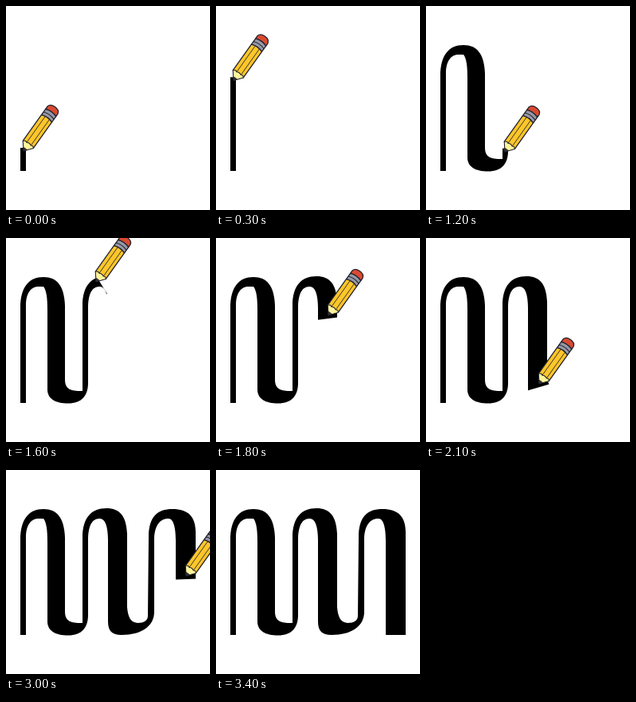
Recreate the animation shown at these times as an HTML page with a canvas. Size 256 by 256 pixels, loop 5.4 s.

```html
<!DOCTYPE html>
<html>
<head>
<meta charset="utf-8">
<style>
html, body { margin: 0; width: 100%; height: 100%; overflow: hidden; background: #fff; }
canvas { display: block; width: 100vw; height: 100vh; }
</style>
</head>
<body>
<canvas id="stage" width="256" height="256"></canvas>
<script>
const canvas = document.getElementById('stage');
const ctx = canvas.getContext('2d');
const STEP = 100, LOOP = 5400, LAST = 34;
const INK = '#000', OUTLINE = '#20202c';

const letter = new Path2D(`M18 207V88C18 61 29 49 47 49C64 49 73 60 74 85V178
  C74 192 85 192 96 192V85C96 60 107 48 126 48C143 48 151 58 152 80V172
  C153 184 156 191 165 192C173 192 178 189 178 183L179 85
  C179 58 190 49 209 49C228 49 238 58 238 78V207H213V88
  C213 72 210 61 204 61C194 61 187 68 186 85V178
  C186 196 170 207 145 207C133 207 128 202 128 190V88
  C128 70 124 61 118 61C110 61 104 66 103 85V182
  C103 198 95 207.5 78 207.5C62 207.5 52 202 52 190V90
  C52 76 51 66 47 61H41C32 61 25 68 25 85V207Z`);

// The pen starts below the letter, then stops at one point per step.
const route = [
  [21.5, 212], [22, 182], [22, 152], [22, 123], [22, 93.5], [25, 66], [46, 54],
  [63, 81], [63, 110], [63, 141], [63, 170], [70, 196], [92, 200],
  [99, 183], [99, 150], [99, 116], [100, 83], [113, 55], [134, 62],
  [141, 97], [142, 126], [142, 154], [142, 183], [155, 199], [178, 172],
  [182, 139], [182, 108], [182, 77], [190, 58], [209, 54], [223, 90],
  [226, 133], [226, 161], [226, 188], [226, 206]
];

function tangent(i) {
  const a = route[Math.max(i - 1, 0)];
  const b = route[Math.min(i + 1, route.length - 1)];
  return [(b[0] - a[0]) / 2, (b[1] - a[1]) / 2];
}

function tracePath(end) {
  const path = new Path2D();
  path.moveTo(...route[0]);
  for (let i = 1; i <= end; i++) {
    const [x0, y0] = route[i - 1], [x1, y1] = route[i];
    const [u0, v0] = tangent(i - 1), [u1, v1] = tangent(i);
    path.bezierCurveTo(x0 + u0 / 3, y0 + v0 / 3, x1 - u1 / 3, y1 - v1 / 3, x1, y1);
  }
  const [x, y] = route[end], [u, v] = tangent(end);
  const reach = 4 / Math.hypot(u, v);
  path.lineTo(x + u * reach, y + v * reach);
  return path;
}

function shape(d, fill, width = 1.3) {
  const path = new Path2D(d);
  if (fill) {
    ctx.fillStyle = fill;
    ctx.fill(path);
  }
  ctx.strokeStyle = OUTLINE;
  ctx.lineWidth = width;
  ctx.stroke(path);
}

// Drawn along the x axis with its tip at the origin.
function drawPencil(x, y) {
  ctx.save();
  ctx.translate(x, y);
  ctx.rotate(-0.953);
  ctx.lineJoin = 'round';
  shape('M59 -8H63Q68 -7 68 0T63 8H59Q62 0 59 -8Z', '#d94a30');
  shape('M50 -8H59Q62 0 59 8H50Q53 0 50 -8Z', '#9698a6');
  shape('M54.5 -8Q57.5 0 54.5 8', null, 1);
  shape('M10 -8H50Q53 0 50 8H10Z', '#ffc629');
  shape('M11 -3H51M11 3.5H51', null, 0.8);
  shape('M0 0L10 -8Q13 -5 11 -3Q13 0 11 3.5Q13 6 10 8Z', '#fff59b', 1.1);
  shape('M0 0L3.6 -2.8Q4.6 0 3.6 2.8Z', '#333338', 0.8);
  ctx.restore();
}

function draw(step) {
  ctx.globalCompositeOperation = 'source-over';
  ctx.clearRect(0, 0, 256, 256);
  ctx.fillStyle = INK;
  if (step === LAST) {
    ctx.fill(letter);
    return;
  }
  ctx.lineWidth = 40;
  ctx.lineJoin = 'round';
  ctx.strokeStyle = INK;
  ctx.stroke(tracePath(step + 1));
  ctx.globalCompositeOperation = 'destination-in';
  ctx.fill(letter);
  ctx.globalCompositeOperation = 'source-over';
  drawPencil(...route[step + 1]);
}

const start = performance.now();
function tick() {
  const time = (performance.now() - start) % LOOP;
  draw(Math.min(LAST, Math.floor(time / STEP)));
  requestAnimationFrame(tick);
}
tick();
</script>
</body>
</html>
```
